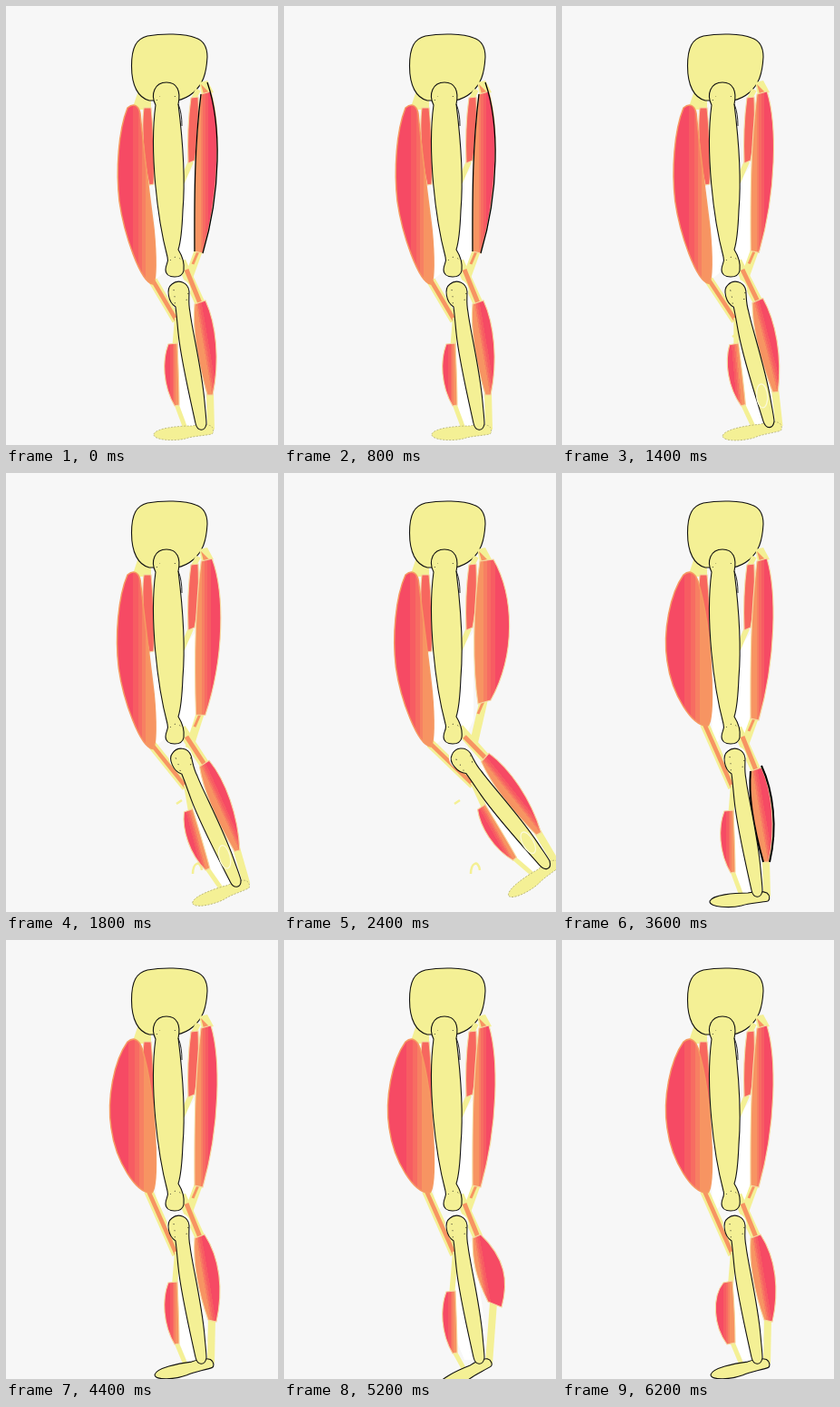
Write an HTML page that moves like this. It is 300 px wide and 483 px high and loops after 6.4 s.

```html
<!DOCTYPE html>
<html lang="en">
<head>
<meta charset="utf-8">
<title>Leg muscles</title>
<style>
  html, body { margin: 0; width: 100%; height: 100%; overflow: hidden; background: #f7f7f7; }
  svg { display: block; width: 100%; height: 100%; }
  .bone { fill: #f4f095; stroke: #111; stroke-width: 1.1; }
  .tendon { fill: #f4f095; }
  .muscle { stroke: #f6d9a0; stroke-width: 1.1; }
  #quad { stroke: #f69a62; stroke-width: 1.5; }
  .cord { stroke: #f4f095; fill: none; }
  .core { stroke: #f79462; fill: none; }
  .detail { fill: none; stroke: #111; stroke-width: .9; }
  .ghost { fill: none; stroke: #f4f095; stroke-width: 2.5; }
  .active { fill: none; stroke: #000; }
</style>
</head>
<body>
<svg viewBox="0 0 300 483">
  <defs>
    <linearGradient id="fromLeft"></linearGradient>
    <linearGradient id="fromRight" x1="1" x2="0"></linearGradient>
    <linearGradient id="calfFill" gradientUnits="userSpaceOnUse" x1="233" y1="385" x2="215.5" y2="388"></linearGradient>
  </defs>
  <rect width="300" height="483" fill="#f7f7f7"/>
  <path fill="#fff" d="M163 195L197 190L209 175L209 272L200 290L176 292L166 300Z"/>

  <path class="tendon" d="M147 90L160 100L160 114L139 114Z"/>
  <path class="bone" d="M138.5 66C138.5 45 144 36 156 33C172 30 198 30 209 35C218 38 222 46 222 56C221 75 217 86 207 95C200 101 194 103 188 104L158 104C146 101 138.5 88 138.5 66Z"/>
  <path class="tendon" d="M213 84L222 82L229 95L216 98Z"/>
  <path fill="#f79462" d="M215 86L224 95L218 97Z"/>
  <path class="cord" stroke-width="6" d="M207 102L212 92M204 171L194 194"/>
  <path class="muscle" fill="#f7675f" d="M204 101L212 100C213 125 212 150 208 170L201 173C200 150 201 122 204 101Z"/>
  <path class="muscle" fill="#f7675f" d="M152 112L160 112C163 140 164 180 163 196L158 197C152 170 149 135 152 112Z"/>

  <line id="quadCord" class="cord" stroke-width="10"/>
  <line id="quadCore" class="core" stroke-width="4.5"/>
  <line id="hamCord" class="cord" stroke-width="9"/>
  <line id="hamCore" class="core" stroke-width="3"/>
  <line id="calfCord" class="cord" stroke-width="11"/>
  <line id="calfCore" class="core" stroke-width="5"/>
  <path id="hamstring" class="muscle" fill="url(#fromRight)"/>
  <path id="hamActive" class="active" stroke-width="1.3" d="M222 84C238 130 237 205 217 272M208 270C208 225 207 160 215 97"/>
  <path id="quad" fill="url(#fromLeft)"/>
  <path id="traces" class="ghost" d="M206 441C206 430 214 424 216 437M188 364L194 360"/>

  <g id="shin">
    <path fill="#fff" d="M188 368L208 328L222 428L222 462H199L190 440Z"/>
    <path class="cord" stroke-width="6" d="M189 343L185 392"/>
    <path id="calfHeel" class="cord" stroke-width="8"/>
    <path id="tibialisFoot" class="cord" stroke-width="5"/>
    <path id="foot" class="bone" d="M163 471C166 464 190 462 205 462C214 460 222 460 226 462C230 465 229 470 227 471C217 473 207 473 198 476C186 479 162 478 163 471Z"/>
    <path id="calf" class="muscle" fill="url(#calfFill)"/>
    <path id="calfActive" class="active" stroke-width="2" d="M220 322C233 350 238 390 229 428M222 428C214 400 205 360 208 328"/>
    <path id="tibialis" class="muscle" fill="url(#fromLeft)"/>
    <circle cx="190.5" cy="313" r="13" fill="#fff"/>
    <path class="bone" d="M187 331C179 326 176 311 183 306C190 300 201 304 202 314C202 322 201 328 203 337C205 355 216 400 219 435C220 447 221 454 221 460C219 469 211 468 209 459C206 445 193 390 190 360C189 350 188 338 187 331Z"/>
    <path class="detail" stroke-dasharray="1 6" d="M185 312Q187 324 186 330M201 316L198 328"/>
    <ellipse id="ankleRing" cx="210" cy="431" rx="6" ry="13" fill="none" stroke="#fbf9d8" stroke-width="1.3"/>
  </g>

  <path class="bone" d="M165 109C159 97 164 84 177 84C189 84 193 94 190 108C194 140 198 190 195 225C194 250 192 262 190 268C195 276 197 283 196 291C195 296 192 298 186 298C180 298 176 295 176 290C176 284 180 282 178 276C167 235 158 160 165 109Z"/>
  <path class="detail" d="M190 108C193 115 194 123 194 132"/>
  <path class="detail" stroke-dasharray="1 5" d="M166 104L170 99M186 99L189 104M181 280Q187 273 193 279"/>
</svg>
<script>
const $ = id => document.getElementById(id);
const STEP = 200, LOOP = 6400;
const KNEE = { x: 190.5, y: 313 }, MAX_FLEX = 29, FOOT_STEP = 3.5;

const bands = ['#f64a64', '#f75c62', '#f76c62', '#f78062', '#f79462'];
const edges = [0, 40, 54, 64, 73, 100];
for (const id of ['fromLeft', 'fromRight', 'calfFill'])
  $(id).innerHTML = bands.map((c, i) =>
    `<stop offset="${edges[i]}%" stop-color="${c}"/><stop offset="${edges[i + 1]}%" stop-color="${c}"/>`).join('');

const shapes = {
  hamstring: ['M215 97L226 94C237 130 236 205 217 272L208 270C208 225 207 160 215 97Z',
              'M216 97L231 95C254 135 256 200 228 250L214 254C208 215 208 150 216 97Z'],
  quad: ['M134 112C140 107 146 108 148 118C152 160 158 205 163 245C166 275 166 302 162 306C148 304 130 250 125 215C121 180 124 137 134 112Z',
         'M134 112C141 106 147 110 150 119C158 145 164 185 165 225C166 250 165 274 161 278C144 280 121 244 116 207C111 175 119 133 134 112Z'],
  calf: ['M208 328L220 324C232 350 236 390 228 428L222 428C214 400 205 360 208 328Z',
         'M208 328L219 324C236 350 240 385 232 420L223 418C213 390 206 358 208 328Z'],
  tibialis: ['M179 372L189 371C190 395 191 420 191 439L186 440C173 418 172 390 179 372Z',
             'M178 372L188 370C190 395 191 420 191 438L182 440C167 420 165 388 178 372Z'],
};

const clamp = v => Math.min(1, Math.max(0, v));
const mix = (a, b, t) => a + (b - a) * t;
const show = (id, on) => $(id).style.visibility = on ? 'visible' : 'hidden';

// Blends two paths that share the same commands.
function morph(name, t) {
  const [a, b] = shapes[name], number = /[\d.]+/g, ends = b.match(number);
  let i = 0;
  $(name).setAttribute('d', a.replace(number, v => mix(+v, +ends[i++], t).toFixed(2)));
}

function line(ids, [x1, y1], [x2, y2]) {
  for (const id of ids)
    for (const [k, v] of Object.entries({ x1, y1, x2, y2 })) $(id).setAttribute(k, v);
}

function poseAt(time) {
  const flex = time <= 2400 ? clamp((time - 1200) / 1200) : clamp((3000 - time) / 600);
  const extend = clamp((time - 2400) / 600);
  const foot = time < 5400 ? Math.min(6, Math.max(0, (time - 4000) / STEP))
                           : 6 - (time - 5400) / STEP;
  return {
    flex, foot,
    quad: time <= 2400 ? .18 * flex : mix(.18, 1, extend),
    tibialis: clamp((time - 5400) / 800),
    hamActive: time < 1200 && time % 800 < 400,
    calfActive: time >= 3200 && time <= 4000 && time % 400 === 0,
    solidFoot: time >= 3000,
  };
}

function draw(time) {
  const p = poseAt(time);
  const angle = p.flex * MAX_FLEX, shift = p.flex * 4.5;
  const rad = angle * Math.PI / 180, cos = Math.cos(rad), sin = Math.sin(rad);
  const onShin = (x, y) => {
    const dx = x - KNEE.x, dy = y - KNEE.y;
    return [KNEE.x + shift + dx * cos + dy * sin, KNEE.y - dx * sin + dy * cos];
  };
  const bulge = p.flex ** 2, pull = p.foot / 2;

  morph('hamstring', bulge);
  morph('quad', p.quad);
  morph('calf', pull);
  morph('tibialis', p.tibialis);
  $('tibialis').setAttribute('transform', `translate(0 ${5 * pull})`);
  $('shin').setAttribute('transform', `translate(${shift} 0) rotate(${-angle} ${KNEE.x} ${KNEE.y})`);
  $('foot').setAttribute('transform', `rotate(${-FOOT_STEP * p.foot} 222 466)`);

  const hamEnd = [mix(212, 220, bulge), mix(270, 251, bulge)];
  line(['quadCord', 'quadCore'], [mix(162, 157, p.quad), mix(302, 276, p.quad)], onShin(188, 346));
  line(['hamCord'], hamEnd, [mix(200, 208, bulge), 303]);
  line(['hamCore'], hamEnd, [hamEnd[0] - 6, hamEnd[1] + 14]);
  line(['calfCord'], [193, 281], onShin(214, 327));
  line(['calfCore'], [199, 290], onShin(214, 327));
  $('calfHeel').setAttribute('d', `M${225 + pull * 2} ${426 - 9 * pull}L226 466`);
  $('tibialisFoot').setAttribute('d', `M188 ${438 + 5 * pull}L198 ${465 + pull * 2}`);

  show('hamActive', p.hamActive);
  show('calfActive', p.calfActive);
  show('traces', p.flex > 0);
  show('ankleRing', p.flex > 0);
  const footStyle = $('foot').style;
  footStyle.stroke = p.solidFoot ? '#111' : '#aaa66a';
  footStyle.strokeWidth = p.solidFoot ? 1.1 : .7;
  footStyle.strokeDasharray = p.solidFoot ? 'none' : '2 1.5';
}

let shown = -1;
function tick() {
  const time = Math.floor(performance.now() % LOOP / STEP) * STEP;
  if (time !== shown) draw(shown = time);
  requestAnimationFrame(tick);
}
tick();
</script>
</body>
</html>
```
